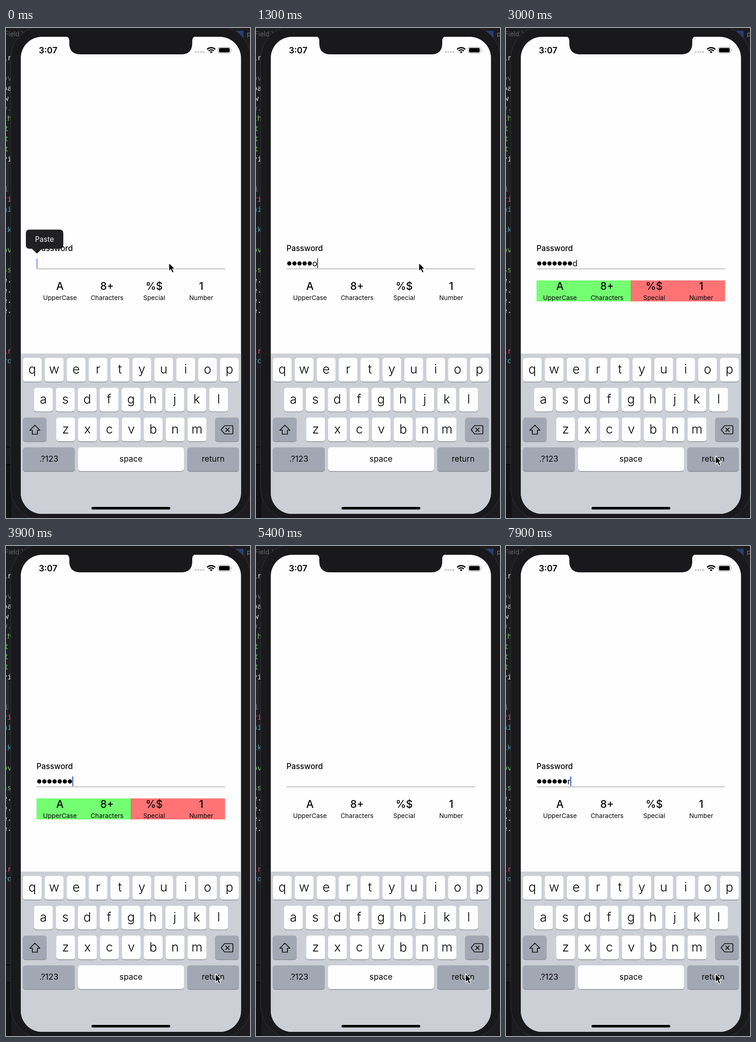
Recreate the animation shown at these times as an HTML page. Size 528 by 1061 pixels, loop 8 s.

```html
<!DOCTYPE html>
<html lang="en">
<head>
<meta charset="utf-8">
<title>Password rules</title>
<style>
  html, body { margin: 0; width: 100%; height: 100%; overflow: hidden; background: #17171b; }
  svg { display: block; width: 100vw; height: 100vh; }
  text { font-family: Inter, Roboto, sans-serif; fill: #050505; }
  .mid { text-anchor: middle; }
  .code text { font: 16px "DejaVu Sans Mono", "Noto Sans Mono", monospace; }
  .key { font-size: 27.5px; font-weight: 300; }
  .word { font-size: 17.4px; }
  .big { font-size: 22.5px; font-weight: 500; }
  .small { font-size: 13.7px; }
</style>
</head>
<body>
<svg viewBox="0 0 528 1061" preserveAspectRatio="none">
  <defs>
    <clipPath id="screen"><rect x="32" y="19" width="476.5" height="1033" rx="46"/></clipPath>
  </defs>

  <rect width="528" height="1061" fill="#1c1c20"/>
  <path d="M0 290H7V353H0Z" fill="#26262a"/>
  <path d="M0 907H10M0 945H10" stroke="#08080a" stroke-width="2"/>
  <rect y="946" width="12" height="115" fill="#121214"/>
  <text x="-3" y="18" font-size="14" style="fill:#66666a">Field 〉</text>
  <rect x="499" y="6" width="15" height="15" fill="#263d78"/>
  <text x="521" y="18" font-size="14" style="fill:#77777b">p</text>
  <g class="code" id="code"></g>

  <rect x="10" y="-5" width="520" height="1072" rx="72" fill="#19181b" stroke="#353438"/>

  <g clip-path="url(#screen)">
    <rect x="32" y="19" width="477" height="1033" fill="#fffeff"/>
    <path d="M129 18Q137 19 137 28V33Q137 57 161 57H379Q403 57 403 33V28Q403 19 411 18Z" fill="#19181b"/>
    <rect x="32" y="705" width="477" height="348" fill="#cccfd6"/>
  </g>

  <text class="mid" x="91" y="54.5" font-size="18.5" font-weight="600">3:07</text>
  <g fill="#c6c6c9">
    <circle cx="410.5" cy="52" r="2.1"/><circle cx="416" cy="52" r="2.1"/>
    <circle cx="421.5" cy="52" r="2.1"/><circle cx="427" cy="52" r="2.1"/>
  </g>
  <g fill="none" stroke="#000" stroke-width="2.6">
    <path d="M435.2 46.2A12.6 12.6 0 0 1 452.8 46.2M438.3 49.6A8 8 0 0 1 449.7 49.6"/>
    <path d="M441 51.5Q444 49.3 447 51.5L444 54.7Z" fill="#000" stroke="none"/>
  </g>
  <rect x="459" y="41.5" width="27" height="13" rx="3.8" fill="none" stroke="#999"/>
  <rect x="461" y="43.3" width="23" height="9.4" rx="2.2"/>
  <path d="M487.8 45.8Q490 48 487.8 50.2Z" fill="#999"/>

  <text x="66" y="483" font-size="16.8" font-weight="500">Password</text>
  <g id="dots"></g>
  <text id="last" y="516" font-size="18"></text>
  <rect id="caret" y="499" width="2.2" height="21" fill="#3859dc"/>
  <path d="M66 521.5H474" stroke="#aaaaac" stroke-width="1.4"/>

  <g id="verdict">
    <rect x="66" y="546.5" width="204.5" height="45.5" fill="#74ff72"/>
    <rect x="270" y="546.5" width="204" height="45.5" fill="#ff7374"/>
    <path d="M270.3 546.5V592" stroke="#a68a48" stroke-width=".9"/>
  </g>
  <g id="rules"></g>

  <g id="paste">
    <path d="M51 436.5H116Q124 436.5 124 444.5V470Q124 478 116 478H78L67 488.5L56 478H51Q43 478 43 470V444.5Q43 436.5 51 436.5Z" fill="#202022"/>
    <text class="mid" x="83.3" y="463" font-size="15.6" style="fill:#f4f4f4">Paste</text>
  </g>

  <g id="keys"></g>
  <g fill="none" stroke="#0a0a0a" stroke-width="1.7" stroke-linejoin="round" stroke-linecap="round">
    <path d="M62.5 860L73.5 871H68V879.5H57V871H51.5Z"/>
    <path d="M473 861H488.5Q491 861 491 863.5V876.5Q491 879 488.5 879H473L465.5 870ZM475.5 866.2L483 873.8M483 866.2L475.5 873.8"/>
  </g>
  <rect x="185" y="1037" width="170.5" height="5.6" rx="2.8"/>

  <path id="mouse" d="M0 0V18.2L4.2 14.3L7.2 21.4L10.6 20L7.6 13H13Z" stroke="#fff" stroke-width="1.3" stroke-linejoin="round"/>
</svg>
<script>
const NS = 'http://www.w3.org/2000/svg';
const $ = id => document.getElementById(id);
function add(parent, tag, attrs, content = '') {
  const el = document.createElementNS(NS, tag);
  for (const k in attrs) el.setAttribute(k, attrs[k]);
  el.textContent = content;
  return parent.appendChild(el);
}

// Slivers of the editor behind the phone: [line, text, colour]
const WHITE = '#d8d8da', GREY = '#62686f', GREEN = '#78bd62', PINK = '#df4f83', TEAL = '#4f9ba8';
[[0, 'ir', WHITE], [2, 'ov', GREY], [3, 'oa', WHITE], [4, 'w', WHITE], [5, 'w.', GREY],
 [6, 'th', GREEN], [7, 't', GREEN], [8, 't', GREEN], [9, 't', GREEN], [10, 'yi', WHITE],
 [13, 'i', GREY], [14, 'ri', PINK], [15, 'ni', TEAL], [17, 'ck', TEAL], [19, 'ov', GREEN],
 [21, 'ss', GREEN], [22, 'e.', WHITE], [23, 'e.', WHITE], [24, 'e.', WHITE], [25, 'e.', WHITE],
 [29, 'ir', PINK], [30, 'ro', TEAL]
].forEach(([line, s, color]) =>
  add($('code'), 'text', { x: s.length > 1 ? -7 : -4, y: 70 + line * 21.88, style: `fill:${color}` }, s));

[['A', 'UpperCase'], ['8+', 'Characters'], ['%$', 'Special'], ['1', 'Number']].forEach(([sign, name], i) => {
  const x = 116.8 + i * 101.9;
  add($('rules'), 'text', { class: 'mid big', x, y: 566.5 }, sign);
  add($('rules'), 'text', { class: 'mid small', x, y: 588.5 }, name);
});

function key(x, y, width, label, cls, fill = '#fffeff') {
  const box = { x, width, height: 51.5, rx: 5.5 };
  add($('keys'), 'rect', { ...box, y: y + 1.4, fill: '#888b91' });
  add($('keys'), 'rect', { ...box, y, fill });
  add($('keys'), 'text', { class: 'mid ' + cls, x: x + width / 2, y: y + (cls === 'key' ? 34 : 31) }, label);
}
const SIDE = '#a2a8b3';
[['qwertyuiop', 36.5], ['asdfghjkl', 60.5], ['zxcvbnm', 108.5]].forEach(([row, left], r) =>
  [...row].forEach((c, i) => key(left + i * 47.4, 714.3 + r * 64.6, 40.8, c, 'key')));
key(36.5, 843.5, 51.5, '', 'word', SIDE);
key(452.5, 843.5, 51.5, '', 'word', SIDE);
key(36.5, 908, 112.5, '.?123', 'word', SIDE);
key(156, 908, 229, 'space', 'word');
key(392.5, 908, 111.5, 'return', 'word', SIDE);

for (let i = 0; i < 8; i++) add($('dots'), 'circle', { cx: 72 + i * 11.05, cy: 509.8, r: 4.6 });

const LOOP = 8000, MASK_DELAY = 1900;
const edits = [];
const type = (word, times) => times.forEach((at, i) => edits.push({ at, count: i + 1, char: word[i] }));
type('Password', [200, 400, 600, 800, 1000, 1200, 1400, 1600]);
[3800, 4300, 4400, 4500, 4600, 4700, 4800, 4900].forEach((at, i) => edits.push({ at, count: 7 - i, char: '' }));
type('P@sswor', [6400, 6700, 7100, 7300, 7500, 7700, 7900]);

const clamp = v => Math.min(1, Math.max(0, v));
const ease = v => v * v * (3 - 2 * v);

// Solid after an edit, then fades out and back in every 900 ms
function caretAlpha(age) {
  const p = age % 900;
  return p < 400 ? 1 : p < 500 ? (500 - p) / 100 : p < 800 ? 0 : (p - 800) / 100;
}

function draw(t) {
  const edit = edits.filter(e => e.at <= t).pop() || { at: -450, count: 0, char: '' };
  const age = t - edit.at;
  const shown = age < MASK_DELAY ? edit.char : '';
  const dots = edit.count - (shown ? 1 : 0);
  [...$('dots').children].forEach((d, i) => d.setAttribute('visibility', i < dots ? 'visible' : 'hidden'));

  const end = 66.4 + dots * 11.05;
  const last = $('last');
  last.textContent = shown;
  last.setAttribute('x', end);
  $('caret').setAttribute('x', end + (shown ? last.getComputedTextLength() : 0) - .4);
  $('caret').setAttribute('opacity', t < 200 ? .65 : caretAlpha(age));

  $('paste').setAttribute('opacity', clamp((300 - t) / 150));
  $('verdict').setAttribute('visibility', t >= 2400 && t < 4900 ? 'visible' : 'hidden');

  const m = ease(clamp((t - 1650) / 400));
  $('mouse').setAttribute('transform', `translate(${352.5 + 101 * m} ${508.5 + 418 * m})`);
}

const start = performance.now();
function tick() {
  draw((performance.now() - start) % LOOP);
  requestAnimationFrame(tick);
}
tick();
</script>
</body>
</html>
```
